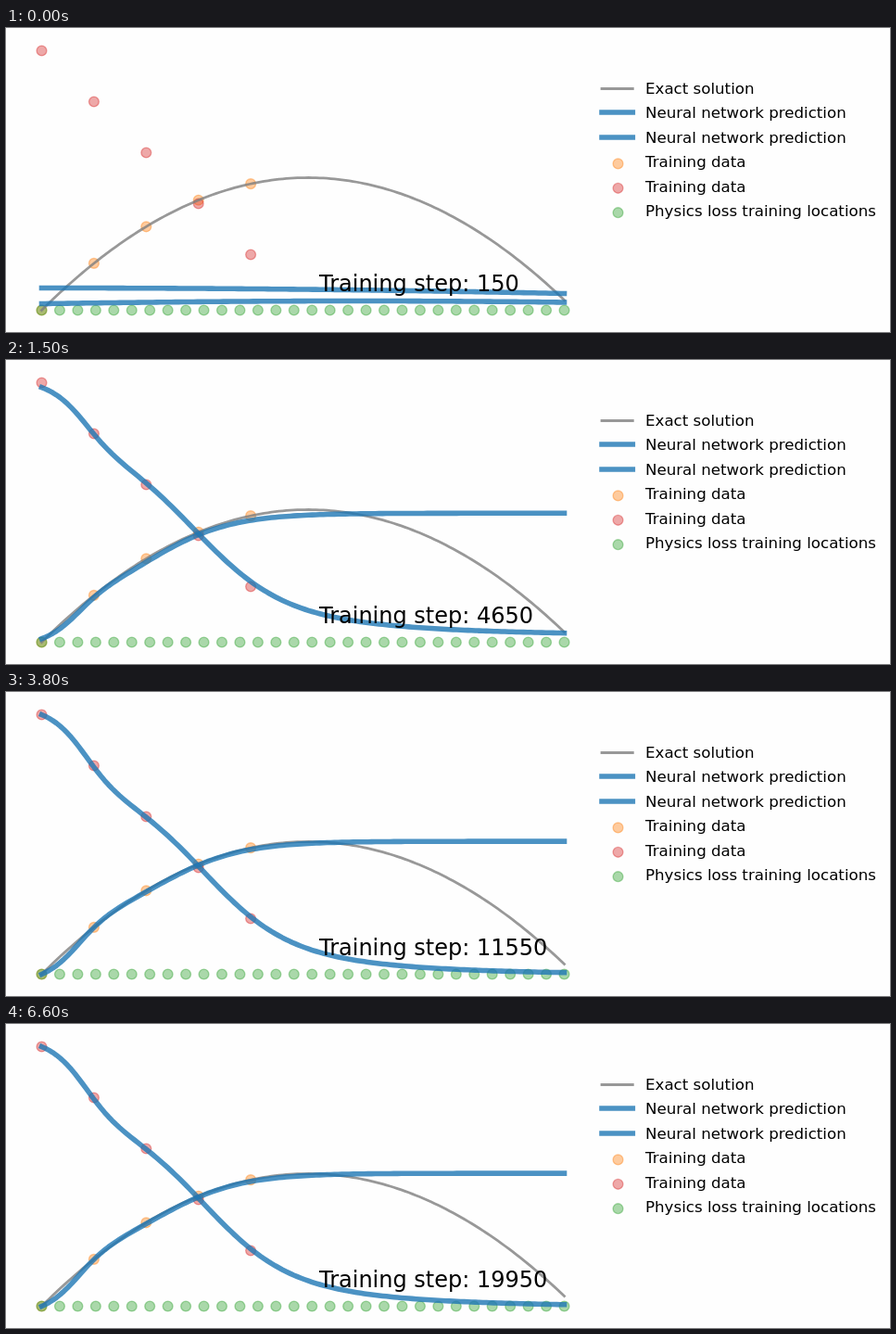
Recreate the animation shown at these times as an HTML page. Size 954x328 px, loop 6650 ms.

```html
<!DOCTYPE html>
<html lang="en">
<head>
<meta charset="utf-8">
<title>Training progress</title>
<style>
  html, body { margin: 0; width: 100%; height: 100%; overflow: hidden; background: #fefefe; }
  svg { display: block; width: 954px; height: 328px; }
  text { font: 16.667px "DejaVu Sans", sans-serif; white-space: pre; }
  #step { font-size: 24px; }
  .exact, .pred { fill: none; stroke-opacity: .8; stroke-linecap: square; stroke-linejoin: round; }
  .exact { stroke: #7f7f7f; stroke-width: 2.78; }
  .pred { stroke: #1f77b4; stroke-width: 5.56; }
  circle { fill-opacity: .4; stroke-opacity: .4; stroke-width: 1.39; }
</style>
</head>
<body>
<svg viewBox="0 0 954 328">
  <g transform="translate(.5 .5)">
    <g id="dots"></g>
    <path id="exact" class="exact"/>
    <path id="position" class="pred"/>
    <path id="velocity" class="pred"/>
  </g>
  <g id="legend"></g>
  <text id="step" x="338" y="284"></text>
</svg>
<script>
const LEFT = 38, RIGHT = 602, WIDTH = RIGHT - LEFT;
const FRAME = 50, FRAMES = 133, STEP = 150;
const ORANGE = '#ff7f0e', RED = '#d62728', GREEN = '#2ca02c';
const $ = id => document.getElementById(id);
const mix = (a, b, k) => a + (b - a) * k;

function add(parent, tag, attrs, text = '') {
  const el = document.createElementNS('http://www.w3.org/2000/svg', tag);
  for (const name in attrs) el.setAttribute(name, attrs[name]);
  el.textContent = text;
  parent.append(el);
}
const dot = (parent, cx, cy, color) =>
  add(parent, 'circle', { cx, cy, r: 5.38, fill: color, stroke: color });

function plot(id, f) {
  let d = '';
  for (let x = LEFT; x <= RIGHT; x += 4) d += `${d ? 'L' : 'M'}${x} ${f(x).toFixed(2)}`;
  $(id).setAttribute('d', d);
}

const exact = x => 161 + 143 * ((x - 325.6) / 287.6) ** 2;

// Static scene
const sampleX = i => LEFT + WIDTH * i / 10;
for (let i = 0; i < 5; i++) dot($('dots'), sampleX(i), exact(sampleX(i)), ORANGE);
for (let i = 0; i < 5; i++) dot($('dots'), sampleX(i), 24 + 55 * i, RED);
for (let i = 0; i < 30; i++) dot($('dots'), LEFT + WIDTH * i / 29, 304, GREEN);
plot('exact', exact);

[
  ['Exact solution', 'exact'],
  ['Neural network prediction', 'pred'],
  ['Neural network prediction', 'pred'],
  ['Training data', ORANGE],
  ['Training data', RED],
  ['Physics loss training locations', GREEN]
].forEach(([label, look], i) => {
  const y = Math.round(71 + 26.4 * i);
  if (look[0] === '#') dot($('legend'), 660.5, 67.2 + 26.4 * i, look);
  else add($('legend'), 'path', { class: look, d: `M643 ${look === 'pred' ? y - 6 : y - 5.5}H676.3` });
  add($('legend'), 'text', { x: 690, y }, label);
});

// One neuron: a smooth step of the given height, zero at the left edge
const sigmoid = z => 1 / (1 + Math.exp(-z));
const neuron = (height, center, spread) => x =>
  height * (sigmoid((x - center) / spread) - sigmoid((LEFT - center) / spread));
const layer = (...neurons) => x => neurons.reduce((sum, f) => sum + f(x), 0);

// Each stage of learning has a left-edge level and a shape added to it
const NETS = {
  position: {
    start: { level: 297, shape: x => -3 * Math.sin(2.6 * (x - LEFT) / WIDTH) },
    early: { level: 268, shape: neuron(-92, 148, 28) },
    late: { level: 304, shape: layer(neuron(-62, 76, 17.3), neuron(-92.5, 165, 44)) }
  },
  velocity: {
    start: { level: 280, shape: x => 6 * ((x - LEFT) / WIDTH) ** 2 },
    early: { level: 72, shape: layer(neuron(150, 168, 33), neuron(54, 250, 120)) },
    late: { level: 24, shape: layer(neuron(80, 84, 18), neuron(173, 212.5, 45), neuron(43, 250, 120)) }
  }
};
const EARLY = 800;

// How far the level and the shape have moved towards the next stage
function progress(t) {
  if (t < EARLY) {
    const u = t / EARLY;
    return { level: 1 - (1 - u) ** 1.15, shape: u ** 1.3 };
  }
  const settle = rate => 1 - Math.exp(-rate * (t - EARLY));
  return { level: settle(.0032), shape: settle(.0027) };
}

function draw(frame) {
  const t = frame * FRAME, k = progress(t);
  for (const name in NETS) {
    const { start, early, late } = NETS[name];
    const [a, b] = t < EARLY ? [start, early] : [early, late];
    plot(name, x => mix(a.level, b.level, k.level) + mix(a.shape(x), b.shape(x), k.shape));
  }
  $('step').textContent = `Training step: ${(frame + 1) * STEP}`;
}

const begin = performance.now();
let shown = -1;
function tick() {
  const frame = Math.floor((performance.now() - begin) / FRAME) % FRAMES;
  if (frame !== shown) draw(shown = frame);
  requestAnimationFrame(tick);
}
tick();
</script>
</body>
</html>
```
